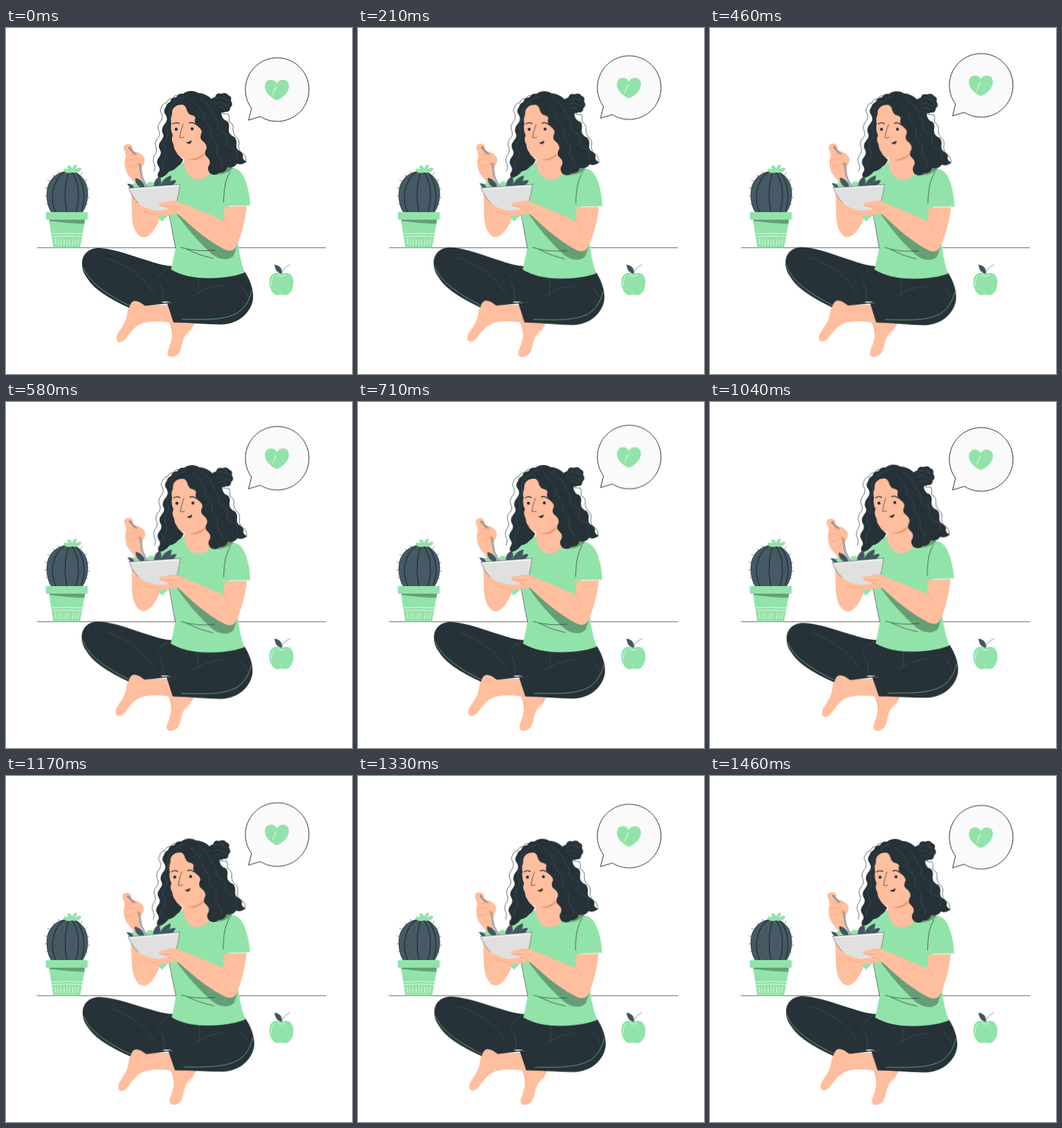
Recreate the animation shown at these times as an HTML page. Size 500 px wide and 500 px high, loop 1500 ms.

```html
<!DOCTYPE html>
<html lang="en">
<head>
<meta charset="utf-8">
<title>Healthy eating</title>
<style>
  html, body { margin: 0; width: 100%; height: 100%; overflow: hidden; background: #fff; }
  svg { display: block; width: 100vw; height: 100vh; }
  .person { transform-origin: 233px 283px; animation: sway 1.5s linear infinite; }
  .bubble { animation: float 1.5s linear infinite; }
  @keyframes sway { 25% { transform: rotate(1deg); } 75% { transform: rotate(-1deg); } }
  @keyframes float { 50% { transform: translateY(-10px); } }
  .green { fill: #92e3a9; }
  .shade { fill: #669f76; }
  .dark { fill: #263238; }
  .slate { fill: #455a64; }
  .skin { fill: #ffbe9d; }
  .line { fill: none; stroke: #263238; stroke-width: .7; stroke-linecap: round; stroke-linejoin: round; }
  .thin { stroke-width: .5; }
  .bold { stroke-width: 1.4; }
  .soft { stroke: #455a64; stroke-width: .6; }
  .fold { stroke: #eb996e; stroke-width: .6; }
  .white { stroke: #fff; stroke-width: .7; }
  .trim { stroke: #92e3a9; stroke-width: .6; }
</style>
</head>
<body>
<svg viewBox="0 0 500 500">
  <path class="line" d="M45 317.600H462"/>

  <g class="cactus">
    <path class="line thin" d="M70 215l-2-3M64 222l-4-2M60 232l-4-1M59 242l-3 1M61 253l-3 1M77 210l-1-3M108 212l2-3M114 221l3-2M117 233l3-1M118 244l3 1M116 254l2 1"/>
    <path class="slate" d="M66 267C58 256 57 235 62 225C68 212 80 207 91 207C105 207 117 219 118 236C119 249 115 260 110 267Z"/>
    <path class="line" d="M66 267C58 256 57 235 62 225C68 212 80 207 91 207C105 207 117 219 118 236C119 249 115 260 110 267"/>
    <path class="line bold" d="M72 267C63 247 66 222 84 208M88 267C84 246 85 224 91 208M101 267C107 246 106 222 95 208M109 264C116 246 113 222 101 209"/>
    <path class="line thin" d="M70 232h3M69 244h3M72 256h3M85 228h3M84 242h3M86 256h3M103 229h3M104 243h3M102 256h3"/>
    <path class="green" d="M94 209C87 211 83 207 83 204C88 202 92 204 94 208C89 204 88 200 90 198C95 199 96 204 96 207C95 201 98 198 102 197C103 202 99 206 97 208C101 202 106 201 109 203C108 208 102 210 97 209Z"/>
    <path class="green" d="M62 277H114.500L107 317.500H68.500Z"/>
    <path class="shade" d="M62.500 277H114L113 283Q87 282 63.500 279Z"/>
    <rect class="green" x="57.500" y="266" width="60.500" height="11" rx="1.500"/>
    <path class="line white" d="M67 297.500Q88 296 110 297.500M68 301.500Q88 300 109 301.500M71 305l1 8M75 307l1 6M79 305l1 9M84 306v7M88 305v9M92 306v7M97 305l-1 9M101 306l-1 7M105 305l-1 8"/>
  </g>

  <g class="apple">
    <path class="green" d="M398 356C392 352 383 353 381 363C379 375 386 387 393 386Q398 384.500 403 386C411 387 417 374 415 364C413 353 404 352 398 356Z"/>
    <path class="line white thin" d="M384 372Q382 362 388 358M393 357Q398 360 403 357"/>
    <path class="line soft" d="M398 356Q400 347 410 342"/>
    <path class="slate" d="M398.500 355C391 354 389 349 388 342C395 343 400 347 398.500 355Z"/>
    <path class="line thin" d="M390 344Q395 348 398 355"/>
  </g>

  <g class="bubble">
    <path d="M367.500 128A46 46 0 1 0 354.800 116.200L350.500 133.200Z" fill="#fafafa" stroke="#263238" stroke-linejoin="round"/>
    <path class="green" d="M391.500 80C388 74 380 73 376 78C371 85 376 98 391.500 104.500C407 98 412 85 407 78C403 73 395 74 391.500 80Z"/>
    <path class="line white thin" d="M385.500 97Q387 90 390.500 84M387.500 90l3-3"/>
  </g>

  <g class="person">
    <!-- far arm and hand -->
    <path class="skin" d="M181 236L182 272C183 290 190 303 200 302.500C210 301 218 286 224 272L238 262V236Z"/>
    <path class="skin" d="M172 179C168 174 170 168 175 168C179 167 182 169 183 173L181 178C190 178 197 182 200 188C202 193 198 199 195 204L196 228H187C184 218 175 214 173 205C171 198 171 191 173 186Z"/>

    <!-- bare feet -->
    <path class="skin" d="M232 420C240 431 242 442 238 455C236 463 231 470 235 474C239 477 247 475 251 468C255 460 254 451 260 443C265 437 269 434 273 426Z"/>
    <path class="skin" d="M178 404C179 397 184 393 190 395L202 400H234L244 426C225 424 206 422 194 428C184 433 180 440 174 448C168 456 159.500 456 159.500 448C160 440 169 433 173 422C176 415 174 409 178 404Z"/>
    <path class="line fold" d="M262 444Q266 439 268 434M239 431q3 5 2 10"/>

    <!-- trousers -->
    <path class="dark" d="M110 342C109 327 120 317 136 318C160 320 181 329 208 337C220 341 231 344 241 344L280 360V393L233 398L201 401.500C196 398 190 393 184 395C180 397 179 401 178 404.500C154 393 131 381 119 364C113 356 110 350 110 342Z"/>
    <path class="dark" d="M238 345L345 352C353 364 358 379 357 391C355 410 337 428 311 428.500C289 428 264 426 242 425.500L233 398Q255 396 272 388Z"/>
    <path d="M224 396Q231 394.500 238 396L228 397Z" fill="#fff"/>
    <path class="line soft" d="M146 333C174 341 202 362 215 386M221 366C228 377 229 388 226 395M240 344Q226 350 219 361M278 360V385M313 372C294 374 281 380 271 387M338 372Q347 380 349 388"/>
    <path class="line trim" d="M111.500 346C119 367 147 386 178 401M255 421C285 421 311 423 332 413C344 407 352 394 355 380"/>

    <!-- shirt -->
    <path class="green" d="M258 192C252 199 243 203 233 206C224 208 219 213 217 223V269L225 280L236.500 269L245 318L238.500 349C254 358 273 362 296 361.500C316 361 334 358 345 353.500Q339 338 336 316L334 300L322 257L353 256.500C352 236 347 217 339 208C333 201 324 202 310 199Z"/>
    <path class="shade" d="M293 210Q312 216 328 203L322 199H300Z"/>
    <path class="shade" d="M246 268C260 288 279 310 298 327C308 335 322 337 329 329L334 314Z"/>
    <path class="line" d="M235.500 268L245 318M324 207C315 222 315 238 314.500 252M253 317Q276 324 302 321M262 320Q280 329 299 333"/>

    <!-- neck and face -->
    <path class="skin" d="M257 180V194C258 208 266 219 277 219C288 219 298 211 298 198L284 176Z"/>
    <path d="M262 189.500C270 191 280 186 285 179L287 183C281 190 272 193 262 189.500Z" fill="#eb996e"/>
    <path class="skin" d="M234 124C237 113 247 107 260 107L292 145V174C286 184 273 190 266 188.500L244 186Q233 160 234 124Z"/>
    <g class="dark">
      <ellipse cx="246" cy="146.300" rx="2.100" ry="2.300"/>
      <ellipse cx="269" cy="145.800" rx="2.100" ry="2.300"/>
      <path d="M259.500 165Q264 166 268 162Q268.500 167.500 263.500 167.500Z"/>
    </g>
    <path class="line bold" d="M241.500 138.500Q245 135.500 250 138M264.500 137.500Q269 135 273.500 139"/>
    <path class="line" d="M256 139Q252 150 251 158Q254 160 257 157.500"/>

    <!-- hair -->
    <path class="dark" d="M231 114q-5 6 0 12q4 6-2 13q-5 6-3 12q4 6-2 12q-5 6-2 12q4 6-1 12q-5 6-1 12q4 6 0 10q-2 5 1 8q9-2 15-10q7-1 12-7q6-3 8-10q-8-6-10-11q-3-3-4-11q-4-6-1-13q-4-8-2-17q-2-6 1-13C239 115 247 110 256 111q4 2 5 7q2 7 8 8q6 2 4 6q-1 7 4 10q8 6 5 11q-3 7 3 11q7 6 4 12q-4 6 2 11q6 6 2 12q-3 6 2 11q8 5 13-1q9 1 12-8q8 3 14-5q6 3 14-3q-5-2-6-6q2-5-4-9q-6-3-5-10q1-10-6-12q-6-4-5-11q2-10-6-12q-5-4-5-11q0-8-8-10C300 102 288 94 278 94C272 90 262 90 256 95q-7-1-10 5q-7 0-9 7q-5 2-6 7Z"/>
    <path class="dark" d="M297 107q-2-6 5-7q2-7 9-5q7-3 10 2q6 2 4 8q4 6-1 10q0 7-7 6q-5 3-9-1q-7 0-7-6Z"/>
    <path class="line soft" d="M303 104q5-6 11-3t9 4M302 110q7-5 13 0t9-2M305 116q6-4 11 1M313 96q6 3 5 9"/>
    <path class="line" d="M247 97Q242 98 240 102q-6 0-8 6q-6 1-7 6q-4 5 0 10q3 6-3 13q-4 6-1 12q3 6-3 12q-4 6-1 12q2 6-3 12q-3 7 1 13q1 5-1 9M306 121q9 4 15 3q3 5 1 11q8 4 6 12q0 6 4 10q7 5 4 14q1 8 6 10q5 4 5 11"/>
    <path class="line soft thin" d="M262 98C248 102 240 109 235 121q5 7 0 13t-2 14t-2 14t-1 14t-1 14t-2 14M268 103C276 111 282 117 286 127q-1 7 5 12t5 12t5 12t4 12t4 13t2 12M281 101C293 111 299 118 300 127q7 4 6 12t7 11t6 12t8 11t6 14"/>

    <!-- salad -->
    <circle class="green" cx="209" cy="228" r="6"/>
    <path class="green" d="M180 231q1-8 9-6l7 7Z"/>
    <g class="slate">
      <path d="M199 232C190 230 186 223 187 217C195 218 200 224 201 231Z"/>
      <path d="M214 231C212 224 216 217 222 215C226 221 224 228 220 232Z"/>
      <path d="M222 231C224 221 231 215 239 213C239 222 234 229 226 232Z"/>
      <path d="M230 231C232 223 239 219 246 220C244 226 239 230 233 232Z"/>
      <path d="M175 225Q183 224 185 231H179Z"/>
    </g>
    <path class="line thin" d="M188 219L200 231M221 217L217 230M237 215L225 230M244 221L232 230"/>

    <!-- fork -->
    <g id="fork" fill="none" stroke-linecap="round">
      <path d="M178 173L188 184C195 193 194 206 197 217L203 229" stroke="#263238" stroke-width="2.200"/>
      <path d="M178 173L188 184C195 193 194 206 197 217L203 229" stroke="#f0f0f0" stroke-width="1.100"/>
    </g>
    <path class="skin" d="M173 183q8-5 13 0q8 0 10 5q1 5-2 8l-9-5l-12 3Z"/>
    <path class="line fold" d="M173 193q8-6 15-1M178 183q7 0 12 5M184 199q5-3 8-3M175 202q6-4 11 0"/>

    <!-- bowl -->
    <path d="M177.500 231.500L251.500 226C250 243 246 257 239 263C227 266 208 264 198 258C187 251 181 241 177.500 231.500Z" fill="#e0e0e0"/>
    <path d="M177.500 231.500L251.500 226L251 229L179 234Z" fill="#f0f0f0"/>
    <path class="line thin" d="M177.500 231.500Q182 244 191 253M251.500 226Q250 240 247 250M177.500 231.500L251.500 226"/>

    <!-- near arm -->
    <path class="skin" d="M316 258L348 257.500C346 277 341 297 334 313C331 321 325 324 316 320C294 309 272 291 249 269C239 268 231 272 221 272C210 271.500 200 269 195 261C197 257 202 260 207 262C217 265 227 264 235 262C230 259 222 259 221 255C222 251 231 252 236 250C242 248 248 249 253 252.500L314 278Z"/>
    <path class="line fold" d="M199 264q8 6 22 5M222 256q8 3 17 2M235 262q7 1 11 5M314 279q7 4 9 12"/>
  </g>
</svg>
</body>
</html>
```
